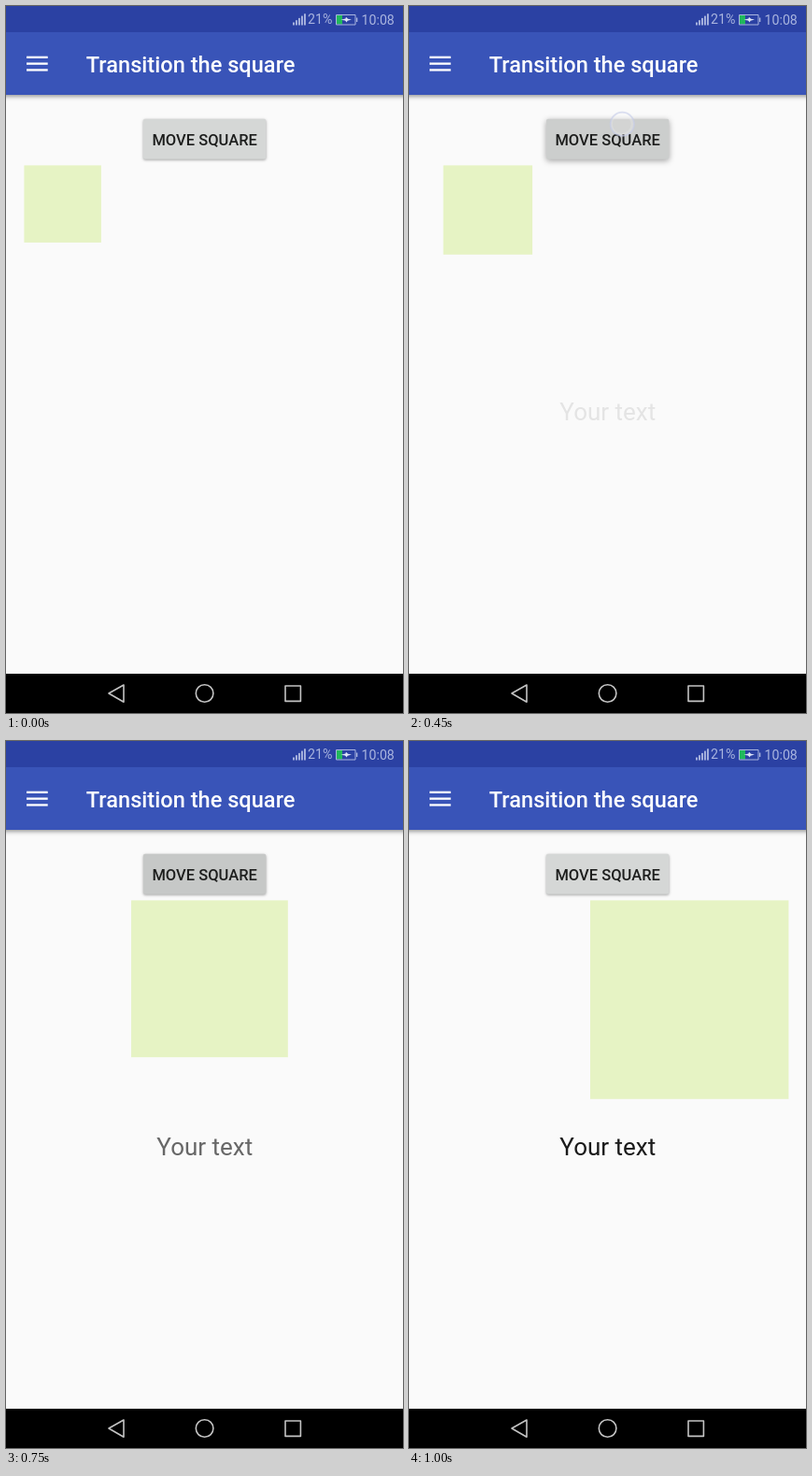
These frames come from a looping animation (425 by 756 pixels, 1.55 s). An HTML page with a canvas:

```html
<!DOCTYPE html>
<html lang="en">
<head>
<meta charset="utf-8">
<title>Transition the square</title>
<style>
  html, body { margin: 0; width: 100%; height: 100%; overflow: hidden; background: #fafafa; }
  canvas { display: block; width: 425px; height: 756px; }
</style>
</head>
<body>
<canvas id="stage"></canvas>
<script>
const W = 425, H = 756, LOOP = 1550, STEP = 50;
const canvas = document.getElementById('stage');
const ctx = canvas.getContext('2d');
const ratio = window.devicePixelRatio || 1;
canvas.width = W * ratio;
canvas.height = H * ratio;

const clamp = v => Math.max(0, Math.min(1, v));
const mix = (a, b, p) => a + (b - a) * p;

// Linear interpolation through [time, value] pairs.
function track(t, keys) {
  if (t <= keys[0][0]) return keys[0][1];
  for (let i = 1; i < keys.length; i++) {
    const [t0, v0] = keys[i - 1], [t1, v1] = keys[i];
    if (t < t1) return mix(v0, v1, (t - t0) / (t1 - t0));
  }
  return keys[keys.length - 1][1];
}

function rect(x, y, w, h, color) {
  ctx.fillStyle = color;
  ctx.fillRect(x, y, w, h);
}

function text(str, x, y, size, weight, color, align = 'left') {
  ctx.font = `${weight} ${size}px Roboto, sans-serif`;
  ctx.textAlign = align;
  ctx.fillStyle = color;
  ctx.fillText(str, x, y);
}

function poly(points) {
  ctx.beginPath();
  points.forEach(([x, y]) => ctx.lineTo(x, y));
  ctx.closePath();
}

function circle(x, y, r) {
  ctx.beginPath();
  ctx.arc(x, y, r, 0, Math.PI * 2);
}

function statusBar() {
  const pale = '#aab5df';
  rect(0, 0, W, 28, '#2b41a3');
  for (let i = 0; i < 5; i++) {
    const h = 3 + i * 2.3;
    rect(307 + i * 3, 20.5 - h, 1.9, h, pale);
  }
  text('21%', 323, 19.3, 14.2, 400, pale);
  rect(354, 10, 6, 9.5, '#21b85c');
  ctx.strokeStyle = pale;
  ctx.lineWidth = 1;
  ctx.strokeRect(353.5, 9.5, 20.5, 10.5);
  rect(375, 12.5, 1.3, 4.5, pale);
  ctx.fillStyle = '#dfe5f7';
  poly([[358.5, 14.8], [363.5, 13.6], [364, 11.8], [366, 13.8], [370, 14.6], [365.5, 15.7], [364.8, 17.6], [363, 15.6]]);
  ctx.fill();
  text('10:08', 380.5, 20, 14.2, 400, pale);
}

function toolbar() {
  ctx.save();
  ctx.shadowColor = 'rgba(0,0,0,.45)';
  ctx.shadowBlur = 5 * ratio;
  ctx.shadowOffsetY = 1.5 * ratio;
  rect(-10, 28, W + 20, 67, '#3954b8');
  ctx.restore();
  for (let i = 0; i < 3; i++) rect(22, 53.7 + i * 6.8, 22.7, 2.3, '#fff');
  text('Transition the square', 85.7, 70.5, 23.6, 500, '#fff');
}

function navBar() {
  rect(0, 714, W, 42, '#000');
  ctx.strokeStyle = '#c4c4c4';
  ctx.lineWidth = 1.6;
  ctx.lineJoin = 'round';
  poly([[110, 735], [126, 726], [126, 744.3]]);
  ctx.stroke();
  circle(212.6, 735, 9.3);
  ctx.stroke();
  ctx.strokeRect(299, 727, 16.4, 16.4);
}

function button(t) {
  const lift = track(t, [[150, 0], [300, 1], [400, 1], [600, 0]]);
  const shade = track(t, [[150, 0], [350, .03], [550, .055], [650, .085], [750, .07], [850, .06], [950, .02], [1000, 0]]);
  const box = () => {
    ctx.beginPath();
    ctx.roundRect(147, 120.7, 131.3, 43, 2);
  };
  ctx.save();
  ctx.shadowColor = 'rgba(0,0,0,.36)';
  ctx.shadowBlur = mix(3, 7, lift) * ratio;
  ctx.shadowOffsetY = mix(1, 2, lift) * ratio;
  ctx.fillStyle = '#d5d7d6';
  box();
  ctx.fill();
  ctx.restore();

  ctx.save();
  box();
  ctx.clip();
  rect(147, 120, 132, 45, `rgba(0,0,0,${shade})`);
  const r = (t - 417) * .3;
  if (r > 0 && t < 700) {
    const p = clamp(r / 70);
    ctx.fillStyle = `rgba(0,0,0,${mix(.055, .03, p)})`;
    circle(mix(228, 226, p), mix(126, 128, p), r);
    ctx.fill();
  }
  ctx.restore();
  text('MOVE SQUARE', 212.6, 148.5, 16.5, 500, '#1d1e1d', 'center');
}

function pointer(t) {
  if (t < 150 || t >= 700) return;
  const fill = track(t, [[350, .5], [550, .12], [650, .05]]);
  const ring = track(t, [[350, .75], [550, .5], [650, .25]]);
  circle(228.3, 126.3, 12.6);
  ctx.fillStyle = `rgba(248,248,250,${fill})`;
  ctx.fill();
  ctx.strokeStyle = `rgba(197,204,232,${ring})`;
  ctx.lineWidth = 1.8;
  ctx.stroke();
}

function draw(t) {
  ctx.setTransform(ratio, 0, 0, ratio, 0, 0);
  rect(0, 0, W, H, '#fafafa');
  toolbar();
  statusBar();
  button(t);

  // Square and label share one accelerate-decelerate progress.
  const x = t >= 1000 ? 1 : clamp((t - 296) / 755);
  const p = (1 - Math.cos(Math.PI * x)) / 2;
  const size = mix(82.5, 212.4, p);
  rect(mix(19.4, 194, p), 170.4, size, size, '#e6f3c4');
  if (p > 0) text('Your text', 212.8, 442.5, 26, 400, `rgba(26,26,26,${p})`, 'center');

  pointer(t);
  navBar();
}

const start = performance.now();
function tick() {
  const t = (performance.now() - start) % LOOP;
  draw(Math.floor(t / STEP) * STEP);
  requestAnimationFrame(tick);
}
tick();
</script>
</body>
</html>
```
